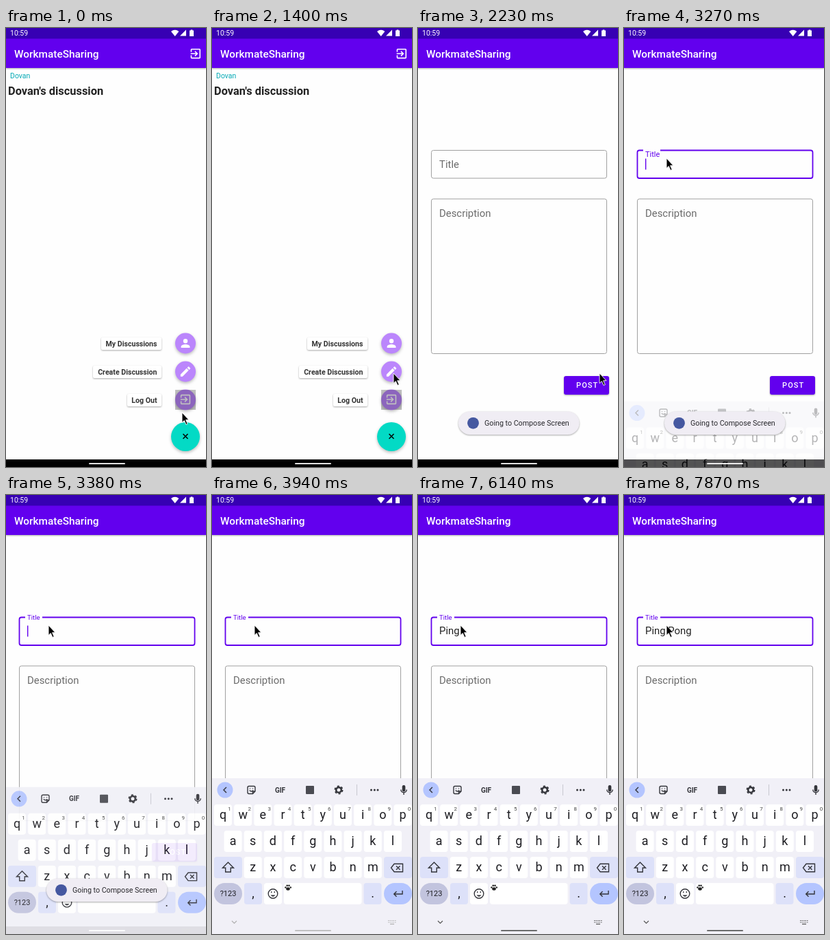
Animation, 292 px wide and 637 px high, one loop 8 s. Source, as an HTML page:

```html
<!DOCTYPE html>
<html lang="en">
<head>
<meta charset="utf-8">
<title>Discussion app</title>
<style>
  html, body { margin: 0; width: 100%; height: 100%; overflow: hidden; background: #fefefe; }
  svg { display: block; width: 292px; height: 637px; font-family: Roboto, sans-serif; }
  #old, #new { transform-origin: 146px 318.5px; }
  .bold { font-weight: 700; }
  .medium { font-weight: 500; }
  .mid { text-anchor: middle; }
  .soft { filter: drop-shadow(0 1px 1px #0005); }
  .lift { filter: drop-shadow(0 2px 2px #0004); }
  .line { fill: none; stroke: #33343a; stroke-width: 1.4; }
  .label { font-size: 10.6px; font-weight: 700; fill: #333; }
  .hint { font-size: 14.9px; fill: #6b6b6b; }
</style>
</head>
<body>
<svg viewBox="0 0 292 637">
  <defs>
    <path id="exit" d="M10.09 15.59L11.5 17l5-5-5-5-1.41 1.41L12.67 11H3v2h9.67zM19 3H5a2 2 0 0 0-2 2v4h2V5h14v14H5v-4H3v4a2 2 0 0 0 2 2h14a2 2 0 0 0 2-2V5a2 2 0 0 0-2-2z"/>
    <g id="frame">
      <rect width="292" height="637" fill="#fefefe"/>
      <rect y="15" width="292" height="43" fill="#6200ee" class="soft"/>
      <rect width="292" height="15.5" fill="#3700b3"/>
      <rect y="626" width="292" height="11"/>
      <text x="12" y="43" font-size="15.4" class="medium" fill="#fff">WorkmateSharing</text>
    </g>
  </defs>

  <g id="old">
    <use href="#frame"/>
    <use href="#exit" transform="translate(267.2 27.6) scale(.8)" fill="#fff"/>
    <text x="6" y="73" font-size="10.5" fill="#03a9b5">Dovan</text>
    <text x="3" y="97" font-size="16.4" class="bold" fill="#222">Dovan's discussion</text>
    <g id="menu">
      <g fill="#fff" class="soft">
        <rect x="139" y="449" width="88" height="18" rx="2"/>
        <rect x="127" y="490" width="100" height="18" rx="2"/>
        <rect x="177" y="531" width="50" height="18" rx="2"/>
      </g>
      <g class="label" text-anchor="end">
        <text x="220.5" y="461.5">My Discussions</text>
        <text x="220.5" y="502.5">Create Discussion</text>
        <text x="220.5" y="543.5">Log Out</text>
      </g>
      <g fill="#bb86fc" class="lift">
        <circle cx="262" cy="457.5" r="15"/>
        <circle cx="262" cy="498.5" r="15"/>
        <circle cx="262" cy="539.5" r="15"/>
      </g>
      <g fill="#fff">
        <path transform="translate(252.4 447.9) scale(.8)" d="M12 12a4 4 0 1 0 0-8 4 4 0 0 0 0 8zm0 2c-2.67 0-8 1.34-8 4v2h16v-2c0-2.66-5.33-4-8-4z"/>
        <path transform="translate(252.4 488.9) scale(.8)" d="M3 17.25V21h3.75L17.81 9.94l-3.75-3.75zM20.71 7.04a1 1 0 0 0 0-1.41l-2.34-2.34a1 1 0 0 0-1.41 0l-1.83 1.83 3.75 3.75z"/>
        <use href="#exit" transform="translate(252.4 529.4) scale(.8)"/>
      </g>
      <rect x="247" y="525" width="30" height="29" opacity=".25"/>
    </g>
    <circle cx="262" cy="593" r="21" fill="#03dac5" class="lift"/>
    <path id="cross" d="M-3.5-3.5l7 7m0-7l-7 7" stroke="#000" stroke-width="1.5"/>
  </g>
  <rect id="dim" width="292" height="637"/>

  <g id="new">
    <use href="#frame"/>
    <rect id="box" x="19.5" y="177.5" width="256" height="40.5" rx="3" fill="none"/>
    <rect id="notch" x="28" y="175" width="25" height="5" fill="#fefefe"/>
    <text id="title" x="31">Title</text>
    <text id="typed" x="31" y="202" font-size="14.9" fill="#222" xml:space="preserve"></text>
    <rect id="caret" y="189.5" width="1.4" height="16" fill="#6200ee"/>
    <rect x="19.5" y="248" width="256" height="224.5" rx="3" fill="none" stroke="#a0a0a0"/>
    <text x="31" y="274" class="hint">Description</text>
    <rect x="213" y="505" width="66" height="27" rx="3" fill="#6200ee" class="soft"/>
    <text x="231" y="522.4" font-size="11" letter-spacing="1.1" class="medium" fill="#fff">POST</text>
  </g>

  <g id="keyboard">
    <rect y="411" width="292" height="226" fill="#f1f0f7"/>
    <circle cx="19" cy="428" r="11.5" fill="#b4c5ff"/>
    <g class="line">
      <path d="M21 424l-4 4 4 4"/>
      <path d="M59.5 433.5H54a2 2 0 0 1-2-2v-7a2 2 0 0 1 2-2h7a2 2 0 0 1 2 2v5.5zv-3.5H63M54.8 428.5q2.7 3 5.4 0M55.5 425.5v1M59.5 425.5v1"/>
      <circle cx="185" cy="428" r="3.8" stroke-width="2.6"/>
      <circle cx="185" cy="428" r="5.6" stroke-width="1.8" stroke-dasharray="3 2.864"/>
      <path d="M275.8 427.5a4.2 4.2 0 0 0 8.4 0M280 432v3"/>
    </g>
    <text x="99.5" y="431.5" font-size="10" class="bold mid" fill="#33343a">GIF</text>
    <rect x="137" y="422" width="12" height="12" rx="1" fill="#4a4b52"/>
    <path d="M211.5 420v16" stroke="#c8c8d0"/>
    <g fill="#33343a">
      <circle cx="232.5" cy="428" r="1.5"/><circle cx="237.3" cy="428" r="1.5"/><circle cx="242" cy="428" r="1.5"/>
      <rect x="277.7" y="421" width="4.6" height="9.5" rx="2.3"/>
    </g>
    <g id="keys"></g>
    <g class="line" stroke-width="1.3">
      <path d="M23.5 533l8 8h-4.2v6h-7.6v-6h-4.2z"/>
      <path d="M261.5 541l4.5-5.8h12.5v11.6H266zm7.5-2.8l5.5 5.6m0-5.6l-5.5 5.6"/>
      <circle cx="89" cy="578.5" r="6.8"/>
      <path d="M85.5 580.5q3.5 4.5 7 0z" fill="#33343a" stroke="none"/>
      <path d="M86.7 575.3v2M91.3 575.3v2M278 574v5h-12m3.5-3.8l-3.8 3.8 3.8 3.8"/>
    </g>
    <g fill="#222">
      <ellipse cx="111" cy="571.5" rx="2.8" ry="2.2"/>
      <circle cx="107.4" cy="569.4" r="1.2"/><circle cx="109.7" cy="566.8" r="1.3"/>
      <circle cx="112.5" cy="566.8" r="1.3"/><circle cx="114.8" cy="569.4" r="1.2"/>
    </g>
    <g id="nav" fill="none" stroke-width="1.2">
      <path d="M29 618l3.5 3.5 3.5-3.5"/>
      <path d="M257 617.5h12M257 620h12" stroke-dasharray="1.5 1"/>
      <path d="M260 622.6h6"/>
    </g>
  </g>

  <g fill="#fff">
    <text x="6" y="11" font-size="10.5">10:59</text>
    <path d="M241 5q5.7-4.4 11.4 0L246.7 12zM263 2.5V11.5H254zM268 3.5h1.7v-1h2.6v1H274v8.5h-6z"/>
  </g>
  <rect id="handle" x="121" y="631.2" width="53" height="1.8" rx=".9"/>
  <g id="toast">
    <rect x="59" y="556.5" width="176.5" height="33.5" rx="16.7" fill="#f0edf4" class="soft"/>
    <circle cx="80.5" cy="573.3" r="8.4" fill="#4558a0"/>
    <text x="97" y="577.2" font-size="10.7" fill="#28282c">Going to Compose Screen</text>
  </g>
  <path id="mouse" d="M0 0V14.5l3.3-3 2.6 6 2.3-1-2.6-5.8H10z" stroke="#fff" stroke-width=".9"/>
</svg>

<script>
const $ = id => document.getElementById(id);
const set = (id, attrs) => { for (const k in attrs) $(id).setAttribute(k, attrs[k]); };
const ramp = (t, a, b) => Math.min(1, Math.max(0, (t - a) / (b - a)));
const smooth = x => x * x * (3 - 2 * x);
const mix = (a, b, x) => a + (b - a) * x;
const gray = v => `rgb(${v},${v},${v})`;

// Keyboard
let keys = '';
function key(x, y, w, label = '', fill = '#fff', size = 18, rx = 4) {
  keys += `<rect x="${x}" y="${y}" width="${w}" height="31" rx="${rx}" fill="${fill}"/>
    <text class="mid" x="${x + w / 2}" y="${y + 15.5 + size * .33}" font-size="${size}" fill="#1d1d22">${label}</text>`;
}
[['qwertyuiop', 3, 449], ['asdfghjkl', 17.6, 487], ['zxcvbnm', 46.8, 525]].forEach(([row, x, y], r) =>
  [...row].forEach((c, i) => {
    key(x + i * 29.17, y, 26, c);
    if (!r) keys += `<text class="mid" x="${x + 22.5 + i * 29.17}" y="458" font-size="8" fill="#444">${(i + 1) % 10}</text>`;
  }));
const tint = '#dde1f9';
key(3, 525, 41, '', tint);
key(251, 525, 41, '', tint);
key(3, 563, 41, '?123', '#c2c4de', 11, 15.5);
key(47, 563, 26, ',', tint);
key(76, 563, 26);
key(105, 563, 113.5);
key(221.5, 563, 26, '.', tint);
key(251, 563, 41, '', '#b4c5ff', 18, 15.5);
$('keys').innerHTML = keys;

// Value of a two-part curve: slow start, quick middle, long settle
const bez = (p, u) => p[0] * (1 - u) ** 3 + 3 * p[1] * u * (1 - u) ** 2 + 3 * p[2] * u * u * (1 - u) + p[3] * u ** 3;
function settle(x) {
  const [px, py] = x < 1 / 6
    ? [[0, .05, .1333, 1 / 6], [0, 0, .06, .4]]
    : [[1 / 6, .2083, .25, 1], [.4, .82, 1, 1]];
  let lo = 0, hi = 1;
  for (let i = 0; i < 20; i++) {
    const m = (lo + hi) / 2;
    if (bez(px, m) < x) lo = m; else hi = m;
  }
  return bez(py, lo);
}

// Mouse stops: time, x, y
const stops = [[0, 257, 558], [30, 257, 558], [440, 265, 501], [2230, 265, 501],
  [2350, 266, 526], [2680, 60, 194], [2770, 62, 189]];
function mouseAt(t) {
  let i = stops.findLastIndex(s => s[0] <= t);
  const a = stops[i], b = stops[i + 1] || a;
  const x = b === a ? 0 : smooth(ramp(t, a[0], b[0]));
  return [mix(a[1], b[1], x), mix(a[2], b[2], x)];
}

// Edits: time, text length, caret position
const words = 'Ping Pong ';
const edits = [[3100, 0, 31], [4790, 1, 41], [4940, 2, 44.5], [5140, 3, 53], [5360, 4, 61.5], [5660, 5, 65.4],
  [6310, 6, 75.3], [6550, 7, 83.7], [6730, 8, 92], [6880, 9, 100.5], [7360, 10, 104.4]];

function draw(t) {
  // Speed dial closes, then the compose screen opens
  const close = smooth(ramp(t, 1400, 1580));
  set('menu', { opacity: 1 - close });
  set('cross', { transform: `translate(262 592.5) rotate(${-45 * close})` });
  const p = settle(ramp(t, 1610, 2010));
  $('old').style.transform = `scale(${1 + .052 * p})`;
  $('new').style.transform = `scale(${.85 + .15 * p})`;
  set('new', { opacity: ramp(t, 1645, 1695) });
  set('dim', { opacity: .14 * p });
  set('toast', { opacity: ramp(t, 1640, 1820) * (1 - ramp(t, 3570, 3800)) });

  // Title field
  const focus = t >= 3160, up = smooth(ramp(t, 3160, 3327));
  set('box', { stroke: focus ? '#6200ee' : '#a0a0a0', 'stroke-width': focus ? 1.8 : 1 });
  set('notch', { opacity: +focus });
  set('title', { y: mix(202.5, 181.3, up), 'font-size': mix(14.9, 9.6, up), fill: focus ? '#6200ee' : '#6b6b6b' });
  const [when, length, caret] = edits.findLast(e => e[0] <= t) || edits[0];
  $('typed').textContent = words.slice(0, length);
  set('caret', { x: caret, opacity: +(focus && (t - when) % 1000 < 480 + 20 * !length) });

  // Keyboard and navigation bar
  const k = smooth(ramp(t, 3150, 3420)), n = ramp(t, 3570, 5160) ** .6;
  set('keyboard', { transform: `translate(0 ${226 * (1 - k)})`, opacity: k ** 1.3 });
  set('nav', { stroke: gray(mix(242, 85, n)) });
  set('handle', { fill: gray(mix(255, 90, n)) });

  set('mouse', { transform: `translate(${mouseAt(t)})` });
}

function tick() {
  draw(performance.now() % 8000);
  requestAnimationFrame(tick);
}
tick();
</script>
</body>
</html>
```
